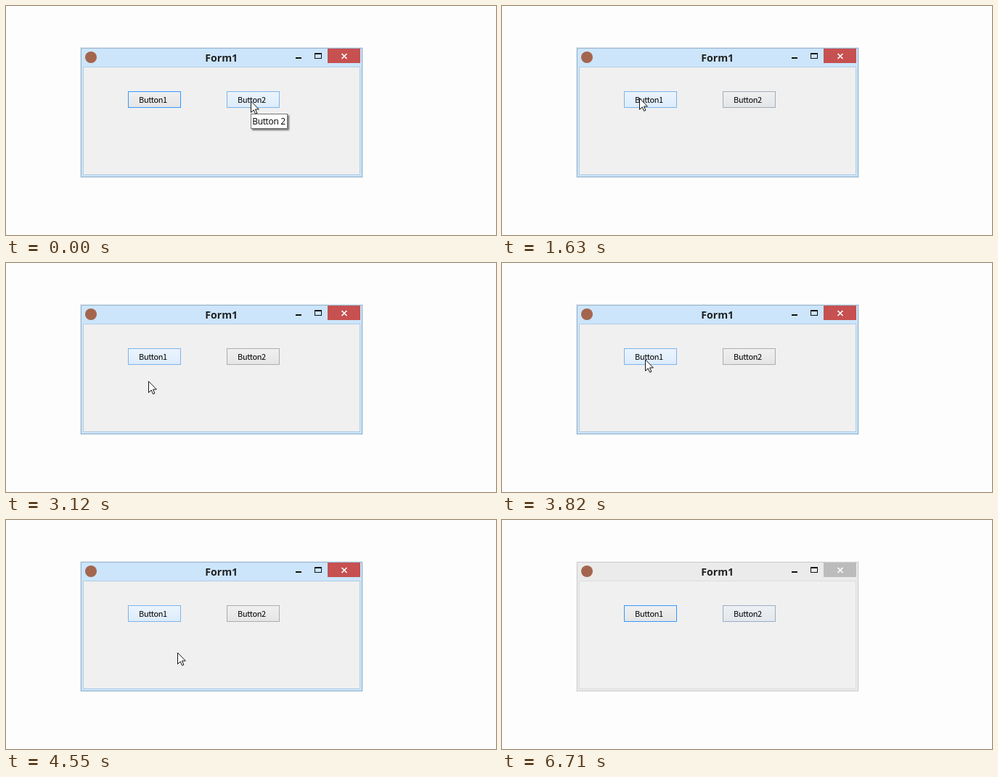
Write an HTML page that moves like this. It is 675 px wide and 317 px high and loops after 8 s.

```html
<!DOCTYPE html>
<html lang="en">
<head>
<meta charset="utf-8">
<title>Form1</title>
<style>
html, body { margin: 0; width: 100%; height: 100%; overflow: hidden; background: #fdfdfd; }
svg { display: block; width: 675px; height: 317px; }

.frame { fill: var(--bar); stroke: var(--edge); }
.glow { fill: none; stroke: var(--glow); }
.inset { fill: #f0f0f0; stroke: var(--inset); }
.close { fill: var(--close); }
.active { --bar: #cce5fb; --edge: #97b5cd; --glow: #e3e9ee; --inset: #b4cde2; --close: #c75050; }
.inactive { --bar: #ebebeb; --edge: #cdcdcd; --glow: #f4f4f4; --inset: #dedede; --close: #bcbcbc; }

.title { font: 700 14.2px "Open Sans", "Noto Sans", sans-serif; fill: #222; }
.label, .big { font-family: "Noto Sans CJK JP", "Noto Sans CJK SC", "Noto Sans", sans-serif; }
.label { font-size: 11px; letter-spacing: -.35px; }
.big { font-size: 80px; letter-spacing: -2.4px; }
.small { font: 12px "Open Sans", "Noto Sans", sans-serif; letter-spacing: -.35px; }

.plain { fill: url(#grey); stroke: #acacac; }
.focus { fill: url(#grey); stroke: #39f; }
.hot { fill: url(#blue); stroke: #7eb4ea; }
.tip { filter: drop-shadow(2px 2px .8px rgba(0, 0, 0, .55)); }

.inactive, #hot1, #hot2, #tip1, #tip2, #cursor { animation: 8s step-end infinite; }
.inactive { animation-name: deactivate; }
#hot1 { animation-name: hot1; }
#hot2 { animation-name: hot2; }
#tip1 { animation-name: tip1; }
#tip2 { animation-name: tip2; }
#cursor { animation-name: pointer; }

@keyframes deactivate {
  0% { opacity: 0 } 82.375% { opacity: .5 } 83.875%, 100% { opacity: 1 }
}
/* Leaving a button lets its highlight fade over one second. */
@keyframes hot1 {
  0% { opacity: 0 } 18.875% { opacity: 1 }
  40.75% { opacity: .86 } 42.625% { opacity: .71 } 44.25% { opacity: 1 }
  58.875% { opacity: .84 } 60.75% { opacity: .69 } 62.25% { opacity: .57 }
  65.625% { opacity: .3 } 67.25%, 100% { opacity: 0 }
}
@keyframes hot2 {
  0% { opacity: 1 } 11.625% { opacity: .86 } 13.75% { opacity: .69 }
  15.5% { opacity: .55 } 17% { opacity: .43 } 18.875% { opacity: .28 }
  20.375% { opacity: .16 } 27.25% { opacity: 0 } 60.75% { opacity: 1 }
  77.5% { opacity: .88 } 82.375% { opacity: .49 } 83.875%, 100% { opacity: .37 }
}
@keyframes tip1 {
  0% { opacity: 0; transform: translate(189px, 145px) }
  27.25% { opacity: 1; transform: translate(189px, 145px) }
  39% { opacity: 0; transform: translate(197px, 151px) }
  51.5% { opacity: 1; transform: translate(197px, 151px) }
  56.875%, 100% { opacity: 0; transform: translate(197px, 151px) }
}
@keyframes tip2 {
  0% { opacity: 1 } 9.875%, 100% { opacity: 0 }
}
@keyframes pointer {
  0% { transform: translate(337px, 131px) }
  9.875% { transform: translate(322px, 194px) }
  11.625% { transform: translate(303px, 224px) }
  13.75% { transform: translate(252px, 190px) }
  15.5% { transform: translate(222px, 158px) }
  17% { transform: translate(199px, 135px) }
  18.875% { transform: translate(192px, 130px) }
  20.375% { transform: translate(189px, 127px) }
  39% { transform: translate(196px, 163px) }
  40.75% { transform: translate(204px, 197px) }
  42.625% { transform: translate(203px, 172px) }
  44.25% { transform: translate(200px, 148px) }
  45.875% { transform: translate(199px, 140px) }
  47.75% { transform: translate(197px, 133px) }
  56.875% { transform: translate(236px, 183px) }
  58.875% { transform: translate(324px, 136px) }
  60.75% { transform: translate(323px, 133px) }
  62.25% { transform: translate(325px, 131px) }
  65.625% { transform: translate(370px, 149px) }
  67.25% { transform: translate(328px, 126px) }
  76% { transform: translate(488px, 311px) }
  77.5%, 100% { transform: translate(700px, 340px) }
}
</style>
</head>
<body>
<svg viewBox="0 0 675 317">
  <defs>
    <linearGradient id="grey" x2="0" y2="1">
      <stop stop-color="#f0f0f0"/><stop offset="1" stop-color="#e5e5e5"/>
    </linearGradient>
    <linearGradient id="blue" x2="0" y2="1">
      <stop stop-color="#ecf4fc"/><stop offset="1" stop-color="#dcecfc"/>
    </linearGradient>
    <g id="window">
      <rect class="glow" x="102.5" y="57.5" width="389" height="180"/>
      <rect class="frame" x="103.5" y="58.5" width="387" height="178"/>
      <rect class="inset" x="106.5" y="84.5" width="381" height="149"/>
      <rect class="close" x="443" y="59" width="45" height="20"/>
    </g>
    <rect id="button" x=".5" y=".5" width="72" height="22"/>
  </defs>

  <use class="active" href="#window"/>
  <use class="inactive" href="#window"/>

  <circle cx="117" cy="71" r="8" fill="#a4654e"/>
  <text class="title" x="296.7" y="77" text-anchor="middle">Form1</text>
  <path d="M399 71h8v2h-8z" fill="#111"/>
  <path d="M425 65h10v8h-10zM426 67v5h8v-5z" fill="#111" fill-rule="evenodd"/>
  <path d="M462.5 66l7 7M469.5 66l-7 7" stroke="#fff" stroke-width="1.7"/>

  <g transform="translate(168 118)">
    <use class="focus" href="#button"/>
    <use class="hot" id="hot1" href="#button"/>
    <text class="label" x="15" y="16">Button1</text>
  </g>
  <g transform="translate(304 118)">
    <use class="plain" href="#button"/>
    <use class="hot" id="hot2" href="#button"/>
    <text class="label" x="15" y="16">Button2</text>
  </g>

  <g id="tip2">
    <rect class="tip" x="337.5" y="149.5" width="50" height="20" fill="#fff" stroke="#767676"/>
    <text class="small" x="339.3" y="164">Button 2</text>
  </g>
  <g id="tip1">
    <rect class="tip" x=".5" y=".5" width="308" height="102" fill="#fff" stroke="#767676"/>
    <rect x="3" y="3" width="304" height="97" fill="#ff0"/>
    <text class="big" x="0" y="84">Button 1</text>
  </g>

  <path id="cursor" d="M.5 .8V16.4L4.2 12.9 6.6 18.4 8.9 17.4 6.5 12H11.4Z" fill="#fff" stroke="#111"/>
</svg>
</body>
</html>
```
